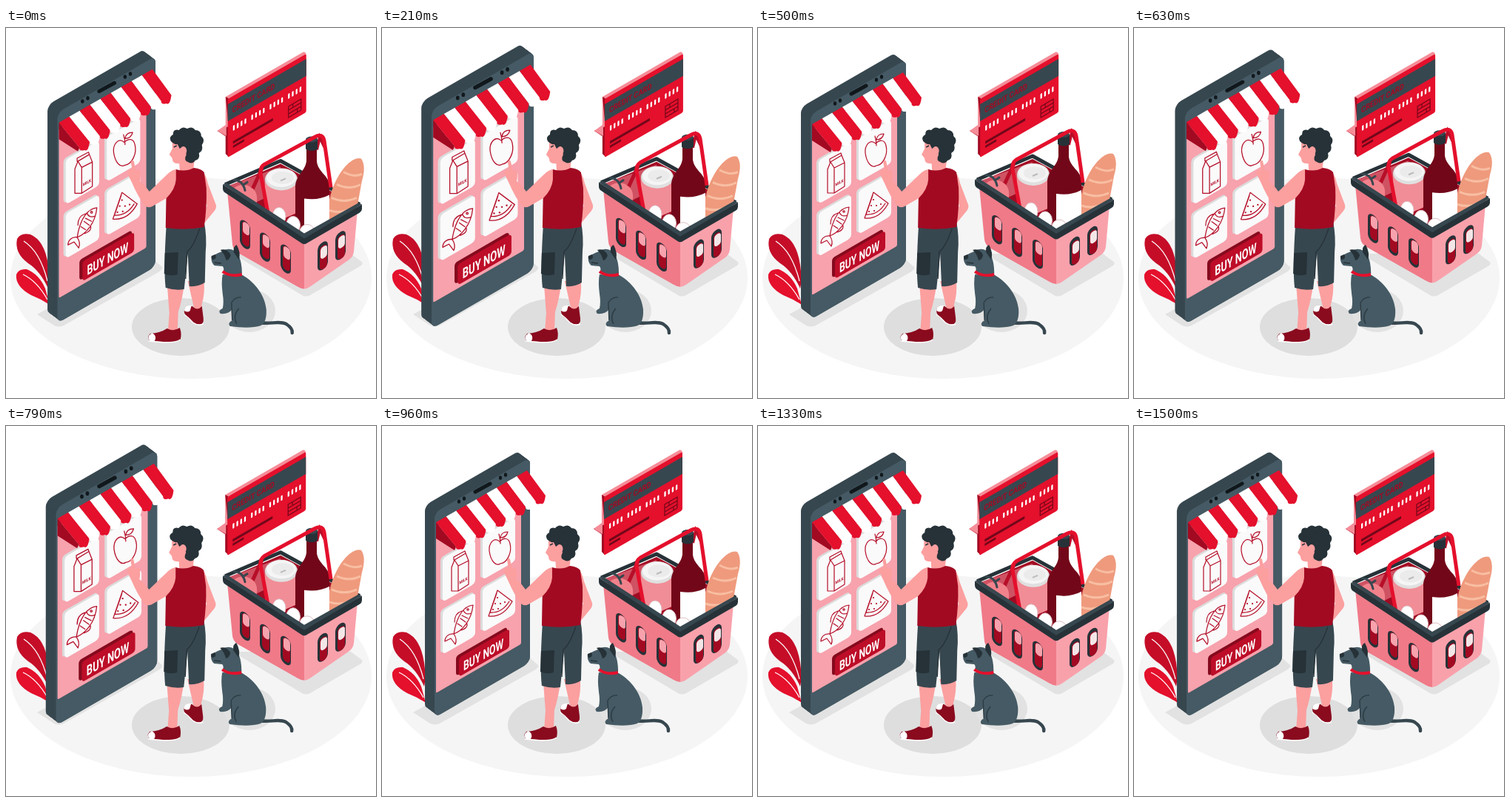
Write an HTML page that moves like this. It is 500 px wide and 500 px high and loops after 1540 ms.

```html
<!DOCTYPE html>
<html lang="en">
<head>
<meta charset="utf-8">
<title>Online grocery shopping</title>
<style>
html, body { margin: 0; width: 100%; height: 100%; overflow: hidden; background: #fff; }
svg { display: block; width: 100%; height: 100%; }
text { font-family: Roboto, sans-serif; font-weight: 700; }
.line { fill: none; stroke: #b50d28; stroke-width: 1.2; stroke-linecap: round; stroke-linejoin: round; }
.red { fill: #e4102c; }
.wine { fill: #a20a22; }
.deep { fill: #720719; }
.shoe { fill: #8a0a1e; }
.dark { fill: #263238; }
.slate { fill: #37474f; }
.steel { fill: #455a64; }
.skin { fill: #fc9f9f; }
.shade { fill: #e2e2e2; }
</style>
</head>
<body>
<svg viewBox="0 0 500 500">
  <ellipse cx="250" cy="338" rx="244" ry="136" fill="#f5f5f5"/>
  <g class="shade">
    <ellipse cx="236" cy="404" rx="66" ry="39" fill="#dedede"/>
    <ellipse cx="329" cy="382" rx="35" ry="29"/>
    <path d="M42 387 L190 305 L211 323 Q212 326 206 330 L78 402 Q71 405 65 402Z"/>
    <path d="M306 305 L400 361 Q405 364 411 361 L480 321 Q484 317 478 314 L466 305Z"/>
  </g>

  <g id="leaves">
    <path fill="#c50d28" d="M15 285 Q20 276 33 279 Q52 287 57 320 Q60 340 57 352 Q46 328 30 318 Q11 304 15 285Z"/>
    <path class="red" d="M14 333 Q17 325 28 326 Q45 333 53 352 L59 374 Q47 366 34 361 Q12 349 14 333Z"/>
    <path d="M24 288 Q46 302 56 342 M23 333 Q42 342 56 367" fill="none" stroke="#fff" stroke-width="1.3"/>
  </g>

  <g id="phone">
    <g id="body"></g>
    <g id="screen"></g>
    <g class="line">
      <path d="M94 191 L98 181 L103 189 L103 223 L94 223Z M103 189 L117 182 V214 L103 223 M98 181 L113 172 L117 182 M97 181 V177 L112 169 L113 172"/>
      <path d="M159 156 C151 149 144 159 145 169 C147 183 154 190 160 186 C169 185 176 171 173 159 C171 150 164 151 159 156 M160 159 Q160 152 158 146 M160 151 Q161 143 170 143 Q168 151 160 151"/>
      <path d="M123 242 C111 243 101 256 97 281 C108 277 121 263 123 242 M97 281 C90 280 85 285 85 291 L93 287 L99 295 Q102 288 97 281 M108 250 Q98 253 98 265 M115 267 Q116 273 107 276 M110 249 Q112 256 121 253 M102 267 L108 271 M106 260 L113 265 M108 256 L116 260"/>
      <circle cx="116" cy="248" r="1.2"/>
      <path d="M156 222 L144 257 Q164 259 176 237Z M155 226 L146 252 Q162 253 172 237"/>
    </g>
    <g id="seeds" fill="#b50d28"></g>
    <g id="awning"></g>
  </g>

  <g class="sway">
    <path fill="#f58d98" d="M297 93 L401 33 Q404 31 406 35 L301 96 V132 L299 148 L286 139 L297 131Z"/>
    <path class="wine" d="M297 93 L301 95 V174 L297 170 V146 L286 139 L301 133Z"/>
    <path fill="#f58d98" d="M286 139 L298 131 V146Z"/>
    <g id="card"></g>
  </g>

  <g id="basket">
    <path class="wine" d="M299 215 L371 184 L474 240 L403 284Z"/>
    <path fill="#cf5263" d="M302 213 L371 188 V220 L330 240Z"/>
    <path d="M296 212 L371 180 L478 239" fill="none" stroke="#263238" stroke-width="5" stroke-linejoin="round"/>
    <path d="M325 236 L346 190" stroke="#b80e28" stroke-width="5"/>
    <path d="M420 165 L424 148 L432 165" fill="none" stroke="#b80e28" stroke-width="4"/>
    <path fill="#f1828c" d="M304 224 C308 210 326 211 331 216 C344 222 340 246 330 247Z"/>
    <path d="M308 206 Q320 206 323 220 M326 209 L320 213" fill="none" stroke="#37474f" stroke-width="3" stroke-linecap="round"/>
    <path fill="#f18d96" d="M350 204 H394 V250 L366 262 L350 244Z"/>
    <ellipse cx="372" cy="205" rx="22" ry="15" fill="#e0e0e0"/>
    <ellipse cx="372" cy="203" rx="20" ry="12.5" fill="#f5f5f5"/>
    <ellipse cx="374" cy="203" rx="15" ry="8.5" fill="#ebebeb"/>
    <path d="M371 207 l7 -3" stroke="#bbb" stroke-width="2"/>
    <path fill="#ef9a7d" d="M434 268 C432 240 441 207 459 187 Q471 174 480 177 Q487 187 481 207 L474 245Z"/>
    <path d="M456 195 Q470 203 481 198 M447 212 Q464 220 479 212 M440 230 Q457 238 474 230 M437 247 Q451 252 466 245" fill="none" stroke="#f8bea2" stroke-width="3"/>
    <path class="deep" d="M406 157 H420 V181 C422 196 437 200 437 214 V262 Q414 283 391 262 V214 C392 199 405 193 406 180Z"/>
    <path fill="#fff" d="M403 231 Q422 234 437 226 V262 Q425 274 403 270Z"/>
    <path class="dark" d="M405 151 H421 V164 Q413 169 405 164Z"/>
    <ellipse class="slate" cx="413" cy="151" rx="8" ry="4"/>
    <g fill="#fff" stroke="#dcbfc4">
      <ellipse cx="369" cy="255" rx="9" ry="12"/>
      <ellipse cx="388" cy="267" rx="9.5" ry="12"/>
      <ellipse cx="407" cy="276" rx="10" ry="10"/>
    </g>
    <path d="M357 267 L344 197 Q343 189 349 185 L417 148 Q428 142 430 153 L439 216" fill="none" stroke="#e4102c" stroke-width="5" stroke-linejoin="round"/>
    <path fill="#f07a88" d="M299 221 L403 290 V353 Q399 353 394 350 L313 304 Q307 300 306 293Z"/>
    <path fill="#f9a1ab" d="M403 290 L475 247 L470 303 Q469 310 463 314 L411 350 Q407 353 403 353Z"/>
    <g id="slots"></g>
    <path class="dark" d="M293 212 L403 283 L481 239 V245 Q481 248 478 250 L407 291 Q403 294 399 291 L296 223 Q293 221 293 217Z"/>
    <path class="slate" d="M293 212 L298 210 L403 278 L476 237 L481 239 L403 285Z"/>
  </g>

  <g class="sway" id="dog">
    <path d="M343 398 C358 401 369 395 379 400 Q388 406 387 412" fill="none" stroke="#37474f" stroke-width="4.5" stroke-linecap="round"/>
    <path class="steel" d="M293 333 L320 334 C337 344 350 361 352 380 Q353 397 345 402 Q330 407 303 403 Q299 399 306 395 L305 381 Q301 387 290 386 Q286 382 293 379 Q295 371 293 359 Q291 343 293 333Z"/>
    <path d="M306 395 L305 371 Q310 363 318 364 M312 400 Q306 389 315 379" fill="none" stroke="#2d3c44" stroke-width="1.4"/>
    <path class="steel" d="M278 309 Q286 304 292 302 Q300 296 309 301 Q320 309 319 336 L293 332 Q296 325 293 322 L282 321 Q277 317 278 309Z"/>
    <path class="dark" d="M290 300 Q299 297 304 307 Q302 314 298 314 Q295 304 290 300Z M308 303 Q307 295 312 293 Q318 304 315 313Z M278 308 L283 306 Q286 311 281 313 Q277 313 278 308Z"/>
    <path d="M282 317 L291 318" stroke="#263238" stroke-width="1.3"/>
    <path d="M293 329 Q304 337 319 333" fill="none" stroke="#e4102c" stroke-width="4"/>
  </g>

  <g class="sway" id="man">
    <path class="skin" d="M263 192 Q270 195 273 210 L284 239 Q285 243 282 247 L268 264 L264 255 L272 240 L263 222Z"/>
    <path class="skin" d="M218 346 H241 Q239 365 233 384 L232 412 H219 L221 385Z M246 342 H268 Q269 360 265 373 L263 391 H250 L254 377Z"/>
    <path class="shoe" d="M252 376 Q259 383 265 376 L267 392 Q268 400 262 401 Q255 401 248 393 Q241 389 241 382 Q242 375 252 376Z"/>
    <path fill="#fff" d="M241 382 Q242 374 251 375 L249 382 Q246 385 241 382Z"/>
    <path d="M241 387 Q247 391 253 398 Q260 403 267 400" fill="none" stroke="#fff" stroke-width="1.5"/>
    <path class="shoe" d="M218 406 Q227 411 235 405 Q238 412 236 421 Q230 425 214 424 L195 423 Q190 418 195 413 Q209 412 218 406Z"/>
    <path fill="#fff" d="M198 412 Q205 417 201 423 L195 423 Q189 417 198 412Z"/>
    <path d="M193 423 L214 425 Q231 425 236 421" fill="none" stroke="#fff" stroke-width="1.5"/>
    <path class="slate" d="M217 266 L268 262 Q272 282 270 303 L269 344 Q260 350 248 349 L246 305 L241 353 Q229 355 216 351 Q213 325 217 266Z"/>
    <path class="dark" d="M215 304 L233 303 L232 333 Q222 336 214 332Z"/>
    <path d="M262 271 Q253 297 245 302 L243 339" fill="none" stroke="#263238" stroke-width="1.3"/>
    <path class="skin" d="M234 174 L255 178 L253 195 Q243 199 235 192Z"/>
    <path class="wine" d="M230 191 Q243 195 254 189 Q264 190 268 195 L271 216 Q272 242 268 269 Q243 274 216 270 L217 217Z"/>
    <path class="skin" d="M230 191 Q224 192 219 197 L194 221 Q187 211 181 207 Q183 200 181 193 Q178 189 176 194 L173 180 Q171 177 169 181 L171 192 Q163 190 165 198 L170 208 Q179 229 188 240 Q192 244 198 241 L217 230 Q229 218 230 205Z"/>
    <path class="skin" d="M225 151 L243 149 L250 174 Q246 185 231 183 Q225 183 225 176 L221 171 L225 163Z"/>
    <path class="dark" d="M223 153 Q220 147 226 144 Q226 136 234 138 Q239 132 245 136 Q252 132 256 138 Q264 138 264 146 Q270 151 265 158 Q267 166 261 169 Q263 177 256 179 Q252 185 246 181 Q240 179 244 171 L240 160 L235 163 L232 157 Q228 158 223 153Z"/>
    <ellipse class="skin" cx="240" cy="166" rx="4.5" ry="6"/>
    <path d="M227 161 l4 -2" stroke="#263238" stroke-width="1.4"/>
  </g>
</svg>
<script>
const LOOP = 1540, LEAD = 41, RISE = -0.577;
const $ = id => document.getElementById(id);
const add = (id, html) => $(id).insertAdjacentHTML('beforeend', html);
const range = n => [...Array(n).keys()];

// Slanted panel: x runs along the slope, y stays vertical.
const panel = (x, y, w, h, r, fill, k = RISE) =>
  `<rect width="${w}" height="${h}" rx="${r}" fill="${fill}" transform="matrix(1 ${k} 0 1 ${x} ${y})"/>`;
const label = (str, x, y, size, fill, sx = 0.75) =>
  `<text font-size="${size}" fill="${fill}" transform="matrix(${sx} ${sx * RISE} 0 1 ${x} ${y})">${str}</text>`;

function buildPhone() {
  range(14).forEach(i => add('body', panel(58 + i, 107 + i * 0.75, 129, 277, 8, '#37474f')));
  add('body', panel(71, 117, 129, 277, 8, '#455a64') + panel(73, 138, 115, 223, 2, '#f7a2ad'));
  [[104, 102], [111, 98], [160, 70], [167, 66]].forEach(([x, y]) =>
    add('body', `<ellipse cx="${x}" cy="${y}" rx="2.2" ry="2.7" fill="#11181c"/>`));
  add('body', '<path d="M126 89 L146 78" stroke="#11181c" stroke-width="5" stroke-linecap="round"/>');

  [[79, 178], [133, 148], [79, 249], [133, 219]].forEach(([x, y]) =>
    add('screen', panel(x, y, 45, 59, 5, '#dcdcdc') + panel(x + 3, y + 1, 44, 59, 5, '#fafafa')));
  add('screen', panel(100, 311, 69, 27, 4, '#850a1d') + panel(104, 313, 68, 26, 4, '#bd0d28') +
    label('BUY NOW', 110, 331, 18, '#fff', 0.68) + label('MILK', 104.5, 214, 5.5, '#b50d28', 0.85));
  [[156, 232], [153, 240], [160, 240], [150, 248], [157, 247], [166, 238]].forEach(([x, y]) =>
    add('seeds', `<circle cx="${x}" cy="${y}" r="1.1"/>`));

  const top = u => [73 + 123 * u, 130 - 70 * u];
  const low = u => [100 + 121 * u, 163 - 69 * u];
  add('awning', '<path class="wine" d="M73 130 V152 L98 168 L100 163Z"/>');
  range(9).forEach(i => {
    const a = i / 9, b = (i + 1) / 9, [x, y] = low((a + b) / 2);
    add('awning', `<path fill="${i % 2 ? '#fff' : '#e4102c'}" d="M${top(a)} L${top(b)} L${low(b)} Q${x + 5} ${y + 10} ${x} ${y + 7} Q${x - 7} ${y + 9} ${low(a)}Z"/>`);
  });
}

function buildCard() {
  add('card', panel(300, 96, 106, 79, 2, '#e4102c') + panel(300, 103, 106, 23, 0, '#37474f') +
    label('CREDIT CARD', 306, 115, 11, '#a20a22', 0.84));
  range(16).forEach(i => {
    const x = 307 + i * 5.2 + (i >> 2) * 4;
    add('card', panel(x, 132 + (x - 307) * RISE, 2.3, 7, 1, '#fff'));
  });
  add('card', panel(307, 153, 54, 3.5, 0, '#720719') + panel(307, 159, 15, 3, 0, '#720719') +
    '<path d="M382 106 L399 96 V111 L382 121Z M382 111 L399 101 M382 116 L399 106 M388 103 V107 M394 109 V114" fill="none" stroke="#720719" stroke-width="1.2"/>');
}

function buildSlots() {
  const slot = (x, y, k, pale) => add('slots',
    panel(x, y, 14, 37, 7, '#263238', k) + panel(x + 3, y + 3, 10, 32, 5, '#a20a22', k) +
    panel(x + 4, y + 4, 9, 16, 4, pale, k));
  [[316, 257], [343, 274], [371, 290]].forEach(([x, y]) => slot(x, y, 0.6, '#f7a2ad'));
  [[421, 294], [445, 280]].forEach(([x, y]) => slot(x, y, RISE, '#f3e6e7'));
}

// Linear interpolation through [position, value] stops.
function track(p, stops) {
  const i = stops.findIndex(s => s[0] > p);
  const [a, u] = stops[i - 1], [b, v] = stops[i];
  return u + (v - u) * (p - a) / (b - a);
}
const BEAT = [[0, 1], [0.1, 1.1], [0.3, 1], [0.4, 1], [0.5, 1.1], [0.6, 1], [1, 1]];
const SHAKE = [0, -1, 2, -4, 4, -4, 4, -4, 2, -1, 0].map((v, i) => [i / 10, v]);
const FLOAT = [[0, 0], [0.5, -10], [1, 0]];

const swaying = document.querySelectorAll('.sway');
function draw(t) {
  const p = (t + LEAD) % LOOP / LOOP;
  const shake = `translate(${track(p, SHAKE)} 0)`;
  $('phone').setAttribute('transform', `translate(129 213) scale(${track(p, BEAT)}) translate(-129 -213)`);
  $('basket').setAttribute('transform', `translate(0 ${track(p, FLOAT)})`);
  swaying.forEach(el => el.setAttribute('transform', shake));
}

buildPhone();
buildCard();
buildSlots();
const start = performance.now();
function tick() {
  draw((performance.now() - start) % LOOP);
  requestAnimationFrame(tick);
}
tick();
</script>
</body>
</html>
```
